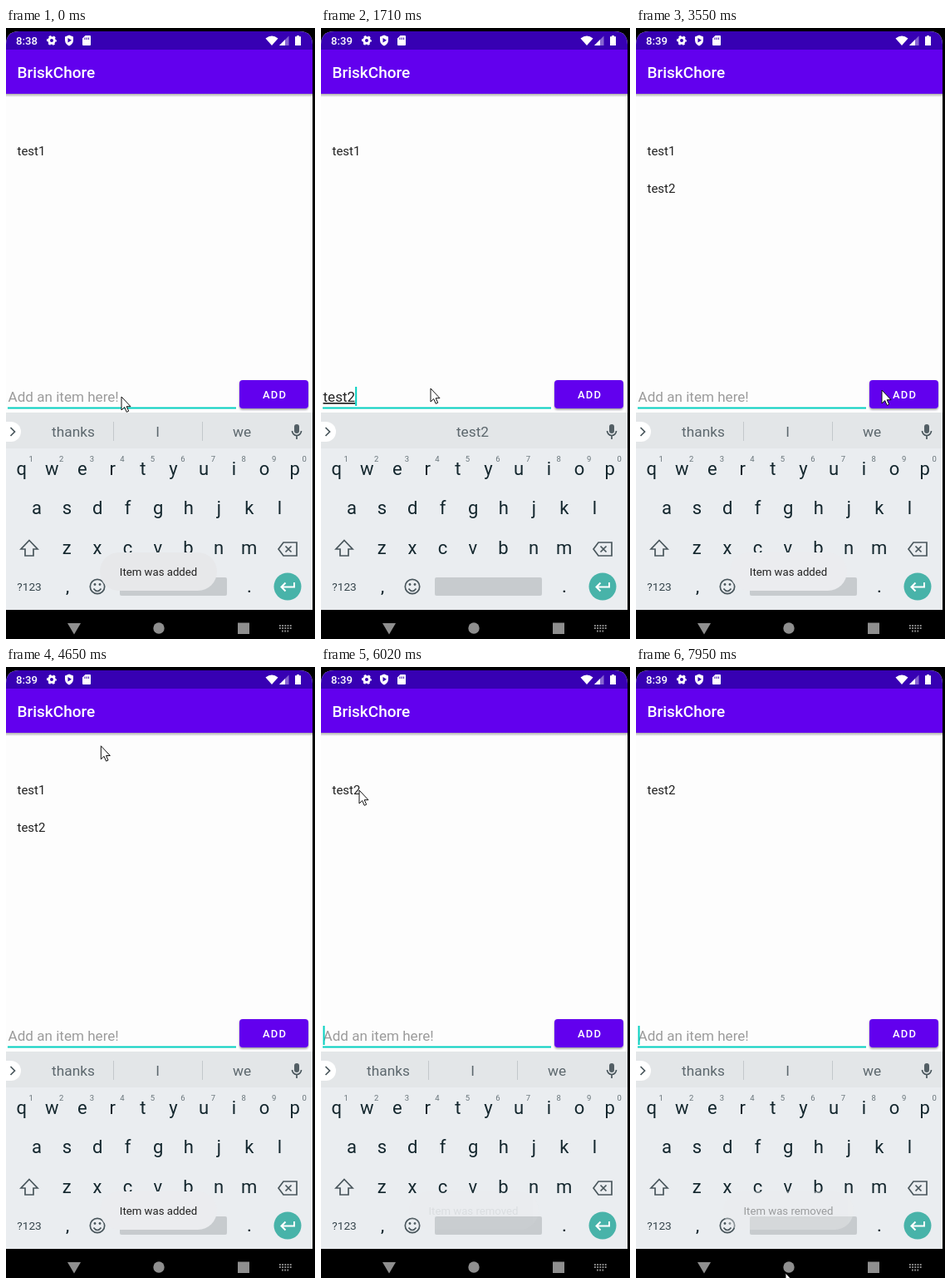
Write an HTML page that moves like this. It is 372 px wide and 734 px high and loops after 8 s.

```html
<!DOCTYPE html>
<html lang="en">
<head>
<meta charset="utf-8">
<title>Todo list demo</title>
<style>
  html, body { margin: 0; width: 100%; height: 100%; overflow: hidden; background: #000; }
  svg { display: block; font-family: Roboto, sans-serif; }
  .mid { text-anchor: middle; }
  .keys { font-size: 22px; fill: #14272e; text-anchor: middle; }
  .hints { font-size: 9.5px; fill: #68747a; text-anchor: middle; }
  .line { fill: none; stroke: #49565c; stroke-width: 1.7; }
</style>
</head>
<body>
<svg width="372" height="734" viewBox="0 0 372 734">
  <defs>
    <clipPath id="screen"><path d="M0 734V20Q0 4 16 4H353Q369 4 369 20V734Z"/></clipPath>
    <linearGradient id="shade" x2="0" y2="1">
      <stop stop-color="#aaa"/><stop offset="1" stop-color="#fdfdfd"/>
    </linearGradient>
    <filter id="drop" x="-10%" y="-20%" width="120%" height="150%">
      <feDropShadow dx="0" dy="1.5" stdDeviation="1" flood-opacity=".4"/>
    </filter>
  </defs>

  <g clip-path="url(#screen)">
    <path d="M0 0H370V734H0Z" fill="#fdfdfd"/>
    <path d="M0 0H370V26H0Z" fill="#3700b3"/>
    <path d="M0 26H370V79H0Z" fill="#6200ee"/>
    <path d="M0 79H370V83H0Z" fill="url(#shade)"/>

    <!-- status bar -->
    <g fill="#fff">
      <text id="clock" x="12" y="20" font-size="13.2" font-weight="500"></text>
      <g fill="none" stroke="#fff">
        <circle cx="55" cy="15" r="3.4" stroke-width="2.8"/>
        <circle cx="55" cy="15" r="5" stroke-width="2" stroke-dasharray="2.6 2.636" stroke-dashoffset="1.3"/>
      </g>
      <path d="M76 8.5L81 10.5V14.5Q81 19 76 21.5Q71 19 71 14.5V10.5Z"/>
      <path d="M74.5 12L79 14.8L74.5 17.5Z" fill="#3700b3"/>
      <path d="M95.5 9H101Q102 9 102 10V20Q102 21 101 21H93Q92 21 92 20V12.5Z"/>
      <path d="M95 11.5V14M97.3 11.5V14M99.6 11.5V14" stroke="#3700b3"/>
      <path d="M312.5 12.5Q320 6.5 327.5 12.5L320 21Z"/>
      <path d="M329 21L340.500 9.500V21Z" opacity=".4"/>
      <path d="M329 21L336 14V21Z"/>
      <path d="M350 9H353V10.300H355V21H348V10.300H350Z"/>
    </g>
    <text x="13.500" y="60" font-size="19" font-weight="500" fill="#fff">BriskChore</text>

    <!-- list and entry row -->
    <g font-size="15" fill="#222">
      <text id="item1" x="13.500" y="152.500"></text>
      <text id="item2" x="13.500" y="198"></text>
    </g>
    <text id="entry" x="2.500" y="449" font-size="17.1"></text>
    <path d="M2 455.500H277V457.500H2Z" fill="#03d0c0"/>
    <rect id="caret" y="431" width="2" height="23" fill="#03d0c0"/>
    <rect id="button" x="281" y="423" width="83" height="34" rx="4" filter="url(#drop)"/>
    <text x="323.500" y="445" class="mid" font-size="13" font-weight="500" letter-spacing="1.200" fill="#fff">ADD</text>

    <!-- keyboard -->
    <path d="M0 462H370V505H0Z" fill="#e3e6e8"/>
    <path d="M0 505H370V699H0Z" fill="#eaedf0"/>
    <path d="M0 473H6A12 12 0 0 1 6 497H0Z" fill="#fff"/>
    <path d="M5.500 480L10.500 485L5.500 490" class="line" stroke-width="2"/>
    <path id="bars" d="M129.500 473V496M236.500 473V496" stroke="#c3c8cb"/>
    <g font-size="17.3" class="mid" fill="#5c676d">
      <text id="hint0" x="81" y="491"></text>
      <text id="hint1" x="182.500" y="491"></text>
      <text id="hint2" x="284" y="491"></text>
    </g>
    <rect x="347" y="476" width="6" height="11" rx="3" fill="#535f65"/>
    <path d="M344.500 484A5.500 5.500 0 0 0 355.500 484M350 489.500V494" class="line"/>
    <g id="keys" class="keys"></g>
    <g id="digits" class="hints"></g>
    <path d="M28 615.500L38 626H33V634H23V626H18Z" class="line"/>
    <path d="M334 618H350V634H334L328 626ZM336.500 622.500L343.500 629.500M343.500 622.500L336.500 629.500" class="line"/>
    <text x="28" y="676" class="mid" font-size="13.7" fill="#35444b">?123</text>
    <g class="keys" font-weight="500"><text x="74" y="678" style="font-size:19px">,</text><text x="293" y="678" style="font-size:19px">.</text></g>
    <circle cx="110" cy="671" r="8.700" class="line"/>
    <path d="M105.500 673.500Q110 679.500 114.500 673.500" class="line"/>
    <circle cx="107" cy="668.500" r="1.400" fill="#49565c"/>
    <circle cx="113" cy="668.500" r="1.400" fill="#49565c"/>
    <rect x="137" y="660" width="129" height="22" rx="2" fill="#c7cbce"/>
    <circle cx="339" cy="671" r="16.500" fill="#48b3a9"/>
    <path d="M347 666V671.500H332M336.500 666.500L331.500 671.500L336.500 676.500" fill="none" stroke="#fff" stroke-width="2"/>

    <!-- toast -->
    <g id="toast">
      <rect id="pill" y="630" height="46" rx="23"/>
      <text id="note" x="183.500" y="658" class="mid" font-size="13.2" fill="#222"></text>
    </g>

    <!-- navigation bar -->
    <path d="M0 699H370V734H0Z"/>
    <g fill="#8f8f8f">
      <path d="M74 715H90L82 728.500Z"/>
      <circle cx="184" cy="721" r="6.700"/>
      <path d="M279 714.500H293V728H279Z"/>
      <path d="M329 718H344M329 721H344M332 724.500H341" stroke="#8f8f8f" stroke-width="1.800" stroke-dasharray="1.800 1.400"/>
    </g>
  </g>
  <path id="cursor" d="M0 0V16L3.700 12.500L6.200 18.300L8.700 17.200L6.200 11.700H11Z" fill="#fff" stroke="#111"/>
</svg>
<script>
const LOOP = 8000;
const el = id => document.getElementById(id);
const set = (id, text) => { if (el(id).textContent !== text) el(id).textContent = text; };
const attr = (id, values) => {
  for (const name in values) el(id).setAttribute(name, values[name]);
};
const clamp = v => Math.max(0, Math.min(1, v));
const last = (list, t) => list.filter(step => step[0] <= t).pop();

const letters = (id, text, x, y) => {
  el(id).innerHTML += [...text].map((c, i) =>
    `<text x="${x + i * 36.55}" y="${y}">${c}</text>`).join('');
};
letters('keys', 'qwertyuiop', 18.7, 537);
letters('keys', 'asdfghjkl', 37, 584);
letters('keys', 'zxcvbnm', 73.3, 631.5);
letters('digits', '1234567890', 30.2, 521);

const idle = ['thanks', 'I', 'we'];
// time, entered text, suggestions
const typing = [
  [0, '', idle],
  [1230, 'te', ['t', 'thanks', 'thank']],
  [1350, 'tes', ['t', 'thanks', 'thank']],
  [1470, 'test', ['tes', 'test', 'yes']],
  [1590, 'test2', ['', 'test2', '']],
  [3190, '', idle]
];
const lists = [[0, 'test1', ''], [3190, 'test1', 'test2'], [5900, 'test2', '']];
// the caret toggles at each of these times, starting hidden
const blinks = [280, 800, 1230, 2120, 2590, 3070, 3190, 3520, 4020, 4480,
  4980, 5470, 6020, 6570, 6980, 7440, 7930];
// text, pill width, fill, fade-in start and end, fade-out start and end
const toasts = [
  ['Item was added', 141, '#e7e8ea', -2, -1, 1440, 1710],
  ['Item was added', 141, '#ebecef', 3300, 3550, 5320, 5610],
  ['Item was removed', 157, '#ebecee', 6000, 6290, 7800, 8050]
];
// time, x, y
const path = [
  [0, 139, 443], [130, 139, 443], [600, 132, 433], [2200, 132, 433],
  [2710, 296, 435], [3690, 296, 435], [4080, 205, 195], [4320, 205, 195],
  [4700, 110, 90], [5200, 46, 148], [6900, 46, 148], [6980, 39, 148],
  [7400, 39, 148], [7950, 180, 728], [LOOP, 180, 728]
];

function drawToast(t) {
  const [text, width, fill, in0, in1, out0, out1] =
    toasts.find(toast => t < toast[6]);
  const fade = clamp((t - in0) / (in1 - in0)) * clamp((out1 - t) / (out1 - out0));
  set('note', text);
  attr('pill', { x: 183.5 - width / 2, width, fill });
  attr('toast', { opacity: fade });
}

function drawCursor(t) {
  const i = path.findIndex(p => p[0] > t);
  const [t0, x0, y0] = path[i - 1], [t1, x1, y1] = path[i];
  const k = (t - t0) / (t1 - t0), ease = k * k * (3 - 2 * k);
  attr('cursor', {
    transform: `translate(${x0 + (x1 - x0) * ease} ${y0 + (y1 - y0) * ease})`
  });
}

function draw(t) {
  const [, typed, hints] = last(typing, t);
  const [, first, second] = last(lists, t);
  set('clock', t < 1230 ? '8:38' : '8:39');
  set('item1', first);
  set('item2', second);
  set('entry', typed || 'Add an item here!');
  attr('entry', {
    fill: typed ? '#222' : '#9b9b9b',
    'text-decoration': typed ? 'underline' : 'none'
  });
  attr('caret', {
    x: 2.5 + (typed ? el('entry').getComputedTextLength() : 0),
    opacity: blinks.filter(b => b <= t).length % 2
  });
  hints.forEach((hint, i) => set('hint' + i, hint));
  const strong = typed && hints[0];
  attr('hint1', { 'font-weight': strong ? 700 : 400, fill: strong ? '#111' : '#5c676d' });
  attr('bars', { opacity: hints[0] ? 1 : 0 });
  attr('button', { fill: t >= 3070 && t < 3310 ? '#7420f0' : '#6200ee' });
  drawToast(t);
  drawCursor(t);
}

const start = performance.now();
function frame() {
  draw((performance.now() - start) % LOOP);
  requestAnimationFrame(frame);
}
frame();
</script>
</body>
</html>
```
